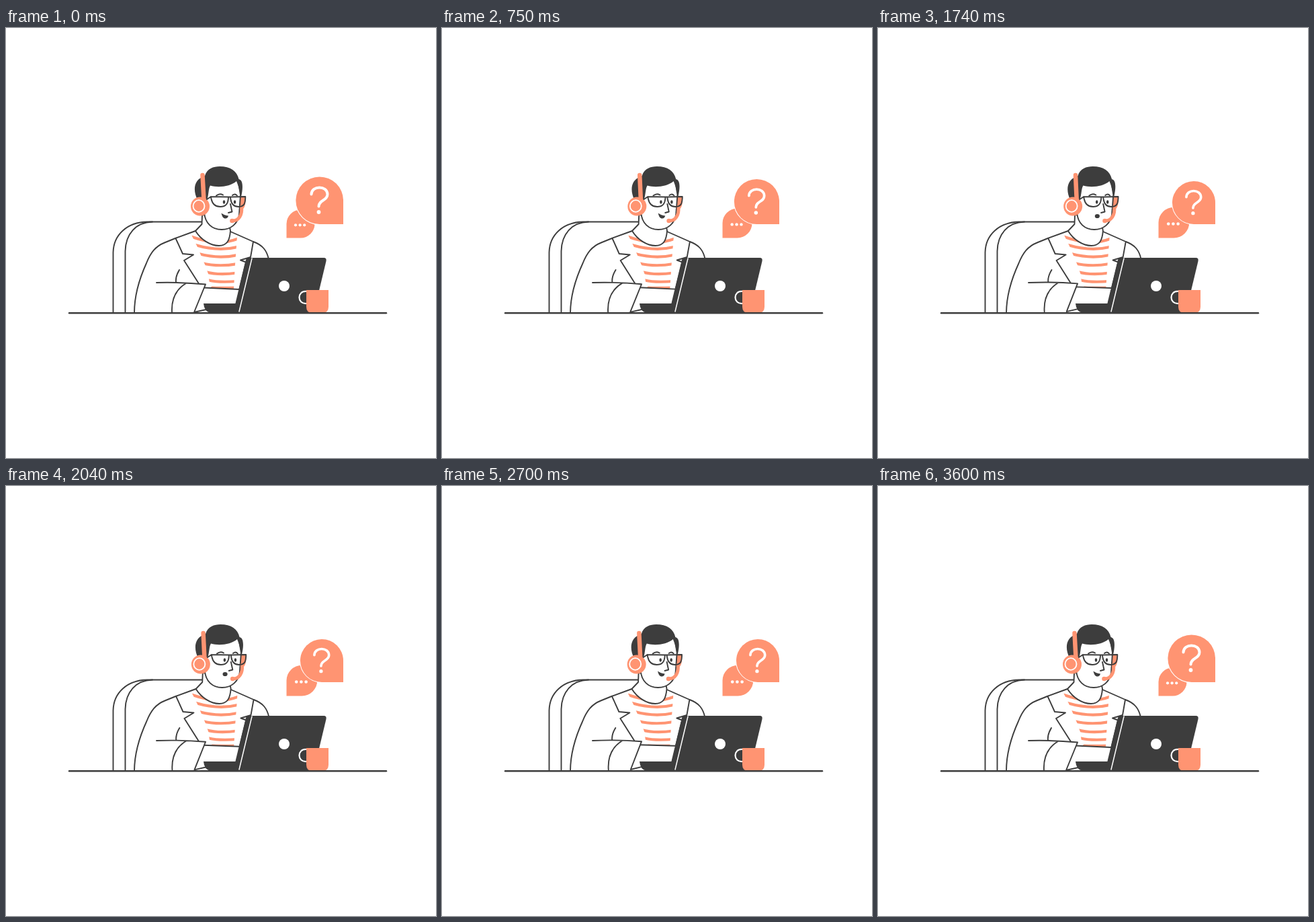
An HTML page for the animation above (3.63 s loop, 640 by 640 pixels).

```html
<!DOCTYPE html>
<html lang="en">
<head>
<meta charset="utf-8">
<title>Help desk</title>
<style>
  html, body { margin: 0; width: 100%; height: 100%; overflow: hidden; background: #fff; }
  svg { display: block; width: 100vw; height: 100vh; }
  .line { fill: none; stroke: #3d3d3d; stroke-width: 1.9; stroke-linecap: round; stroke-linejoin: round; }
  .paper { fill: #fff; }
  .dark { fill: #3d3d3d; }
  .warm { fill: #ff9472; }
  .band { fill: none; stroke: #ff9472; stroke-linecap: round; }
  .chalk { fill: none; stroke: #fff; stroke-linecap: round; }
</style>
</head>
<body>
<svg viewBox="0 0 640 640">
  <defs>
    <clipPath id="shirt"><path d="M276 308L284 324L290 338L296 352L301 366L304 388H339L341 352L344 310Z"/></clipPath>
  </defs>

  <g id="chair" class="line">
    <path d="M159.500 424V334C160 308 180 289 210 288.500H292"/>
    <path d="M177.500 424V332C178 307 193 289 218 288.500"/>
  </g>

  <g id="person">
    <path class="line paper" d="M191 424C191 397 199 372 209 350C215 335 222 325 236 319.500L252 313L282 302L334 303L368 318C382 323 388 331 391 344V424Z"/>
    <g id="stripes" class="band" clip-path="url(#shirt)" stroke-width="4.200"></g>
    <path class="line paper" d="M292 278L291.500 292L282 302C290 315 304 324 317 324C329 324 333 316 334 302L330 280Z"/>
    <g class="line">
      <path d="M252.500 313L263 336L279 337.500L265 346L288 382M258 360Q252 370 253 378"/>
      <path d="M368 318L364 341L349 345.500L357 348.500L347 390"/>
    </g>

    <g id="head">
      <path class="warm" d="M347 250H355Q358 259 355 266Q353 271 348 272Z"/>
      <path class="line paper" d="M295 240V274C296 291 307 300 321 300C335 300 345 291 347 278L349 248L345 224H300Z"/>
      <path class="dark" d="M286 258C278 243 278 226 296 220C299 209 309 206 318 206C334 206 344 213 346.500 225C353 226 353 238 350 251C348 247 348 240 343 228C334 236 316 238 304 234.500C301 239 302 248 299 256Z"/>
      <path class="band" stroke-width="6.500" d="M292.500 219L294.500 256"/>
      <circle class="warm" cx="289" cy="265.500" r="14"/>
      <ellipse class="chalk" cx="287" cy="265" rx="8.500" ry="8.800" stroke-width="1.800"/>
      <path class="band" stroke-width="5" d="M350.500 266C352 279 346 287 337 287"/>
      <circle class="warm" cx="336.500" cy="287" r="3.300"/>
      <g class="line">
        <path d="M299 255L305 251L331 251.500C331 262 327 266 319 266C310 266 306 261 305 251M331 251.500H334L356.300 251C356.300 262 354 266 346 266C338 266 334.500 261 334 251.500"/>
        <path d="M313 249.500Q318 245.500 323 248.500M337 249Q341 246 344 249.500M334 262L336.500 273.500L331 275"/>
      </g>
      <ellipse class="dark" cx="324.500" cy="259" rx="1.800" ry="2.700"/>
      <ellipse class="dark" cx="340.500" cy="259" rx="1.800" ry="2.700"/>
      <path id="smile" class="dark" d="M320.500 275.500Q325 279 331 279.500Q330 284 325.500 283.500Q321.500 282 320.500 275.500Z"/>
      <ellipse id="gasp" class="dark" cx="325.300" cy="280" rx="3.600" ry="3.100"/>
    </g>
  </g>

  <g id="arm">
    <path class="paper" d="M290 386L347 389V424H290Z"/>
    <path class="line" d="M294 386.500L347 389"/>
    <path class="paper" d="M224 379Q260 378 297 381.500L280 423H225Z"/>
    <path class="line" d="M224 379Q260 378 297 381.500L280 423L298 419M268 380C253 389 246 404 247 423"/>
  </g>

  <g id="desk">
    <path class="dark" d="M294 410H342V424H304Q295 422 294 410Z"/>
    <path class="dark" d="M361 342H473Q477.500 342 476.500 347L458 424H338L357 345Q358 342 361 342Z"/>
    <path class="chalk" stroke-width="1.500" d="M366 343L347 422"/>
    <circle class="paper" cx="414" cy="384" r="8"/>
    <path class="chalk" stroke-width="2.200" d="M447 392C433 391 433 411 447 410"/>
    <path class="warm" d="M447 390H480V415Q480 424 471 424H456Q447 424 447 415Z"/>
    <path class="line" style="stroke-width:2.400" d="M94 424.200H566"/>
  </g>

  <g id="chat">
    <path class="warm" d="M417.500 312.500V291.500A21 21 0 1 1 438.500 312.500Z"/>
    <g class="paper">
      <circle cx="431" cy="293.300" r="2.100"/><circle cx="437.600" cy="293.300" r="2.100"/><circle cx="444.200" cy="293.300" r="2.100"/>
    </g>
  </g>
  <g id="question">
    <path class="warm" stroke="#fff" stroke-width="2" paint-order="stroke" d="M502 292V256.500A35.300 35.300 0 1 0 466.700 292Z"/>
    <path class="chalk" stroke-width="4" d="M454.500 247.500C455 234 478 234 478.500 247.500C478.500 257 465.500 256 465.500 265.500"/>
    <circle class="paper" cx="465.500" cy="274" r="2.900"/>
  </g>
</svg>

<script>
  const LOOP = 3630;
  const $ = id => document.getElementById(id);

  // Paper shapes that carry an outline keep their white fill.
  document.querySelectorAll('.line.paper').forEach(el => el.style.fill = '#fff');

  // Left end, sag and right end of each shirt stripe.
  const stripes = [[311, 325, 314], [323, 333, 326], [336, 344, 338], [350, 356, 351],
                   [363, 368.5, 364.5], [375.5, 379, 377], [386.5, 387, 386.5]];
  $('stripes').innerHTML = stripes
    .map(([left, sag, right], i) => `<path d="M${277 + i * 5} ${left}Q316 ${sag} 344 ${right}"/>`)
    .join('');

  // Eased value at time t between [time, value] keys.
  function ease(t, keys) {
    const i = keys.findIndex(key => key[0] > t);
    if (i < 0) return keys[keys.length - 1][1];
    const [t0, a] = keys[i - 1], [t1, b] = keys[i];
    const p = (t - t0) / (t1 - t0);
    return a + (b - a) * p * p * (3 - 2 * p);
  }

  const swapKeys = [[0, 0], [100, 0], [1350, 1], [2850, 1], [3600, 0]];
  const leanKeys = [[0, 0], [850, 1], [1350, 1], [2370, 0.5], [3030, 0.45], [3630, 0]];
  const liftKeys = [[0, 0], [750, 0.1], [1350, 0.1], [1800, 0.5], [2370, 0], [3000, 1], [3600, 0]];

  function scaleFrom(id, x, y, scale) {
    $(id).setAttribute('transform', `translate(${x} ${y}) scale(${scale}) translate(${-x} ${-y})`);
  }

  function draw(t) {
    const swap = ease(t, swapKeys);
    scaleFrom('question', 502, 292, 1 - 0.093 * swap);
    scaleFrom('chat', 417.5, 312.5, 1 + 0.09 * swap);

    const lean = -0.5 * ease(t, leanKeys);
    $('person').setAttribute('transform', `translate(0 424) skewX(${lean}) translate(0 -424)`);
    $('arm').setAttribute('transform', `rotate(${-1.9 * ease(t, liftKeys)} 224 379)`);

    const talking = t >= 1050 && t < 2700;
    $('smile').style.display = talking ? 'none' : '';
    $('gasp').style.display = talking ? '' : 'none';
  }

  const start = performance.now();
  function tick() {
    draw((performance.now() - start) % LOOP);
    requestAnimationFrame(tick);
  }
  tick();
</script>
</body>
</html>
```
